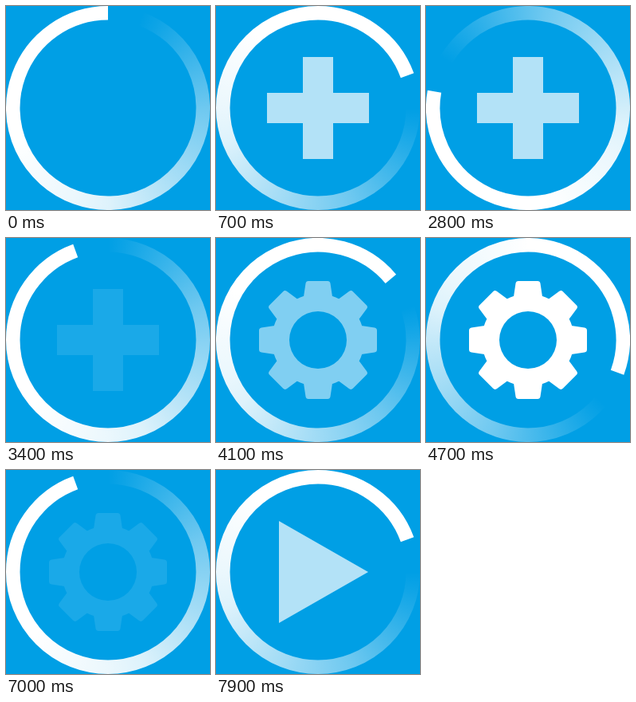
An HTML page with a canvas that plays this animation: 256x256 px, repeating every 8 s.

```html
<!DOCTYPE html>
<html lang="en">
<head>
<meta charset="utf-8">
<title>Progress ring</title>
<style>
  html, body { margin: 0; width: 100%; height: 100%; overflow: hidden; background: #009fe5; }
  canvas { display: block; width: 100vw; height: 100vh; }
</style>
</head>
<body>
<canvas id="stage" width="256" height="256"></canvas>
<script>
const ctx = document.getElementById('stage').getContext('2d');
const LOOP = 8000, STEP = 100, ICON_TIME = 3600, FADE = 1000, FADE_END = 3500;
const rad = deg => deg * Math.PI / 180;

// Tail opacity: [degrees behind the head, alpha]
const TAIL = [
  [0, 1], [110, 1], [160, 0.92], [180, 0.87], [210, 0.72],
  [250, 0.53], [270, 0.43], [300, 0.24], [330, 0.05], [340, 0]
];

const cross = new Path2D('M109 64H147V109H192V147H147V192H109V147H64V109H109Z');
const play = new Path2D('M79 64L191 128L79 192Z');
const gear = makeGear();
const icons = [cross, gear, play];

function makeGear() {
  const tooth = new Path2D(
    'M-18.5 -51L-15.5 -71Q-15 -74 -12 -74H12Q15 -74 15.5 -71L18.5 -51Z');
  const path = new Path2D();
  path.arc(128, 128, 58, 0, 2 * Math.PI);
  path.closePath();
  path.moveTo(164, 128);
  path.arc(128, 128, 36, 0, -2 * Math.PI, true);
  path.closePath();
  for (let i = 0; i < 8; i++) {
    path.addPath(tooth, new DOMMatrix().translate(128, 128).rotate(45 * i));
  }
  return path;
}

function drawRing(head) {
  const margin = 10;
  const paint = ctx.createConicGradient(rad(head + margin - 90), 128, 128);
  for (const [behind, alpha] of TAIL) {
    const offset = (360 - margin - behind) / 360;
    paint.addColorStop(offset, `rgba(255,255,255,${alpha})`);
  }
  paint.addColorStop(1, '#fff');
  ctx.strokeStyle = paint;
  ctx.lineWidth = 17.5;
  ctx.beginPath();
  ctx.arc(128, 128, 119.25, rad(head - 340 - 90), rad(head - 90));
  ctx.stroke();
}

function drawIcon(t) {
  const local = t % ICON_TIME;
  const alpha = Math.min(1, local / FADE, (FADE_END - local) / FADE);
  ctx.globalAlpha = Math.max(0, alpha);
  ctx.fillStyle = '#fff';
  ctx.fill(icons[Math.floor(t / ICON_TIME)]);
  ctx.globalAlpha = 1;
}

function draw(now) {
  const t = Math.floor((now % LOOP) / STEP) * STEP;
  ctx.fillStyle = '#009fe5';
  ctx.fillRect(0, 0, 256, 256);
  drawRing(t / 10);
  drawIcon(t);
}

function tick() {
  draw(performance.now());
  requestAnimationFrame(tick);
}
tick();
</script>
</body>
</html>
```
